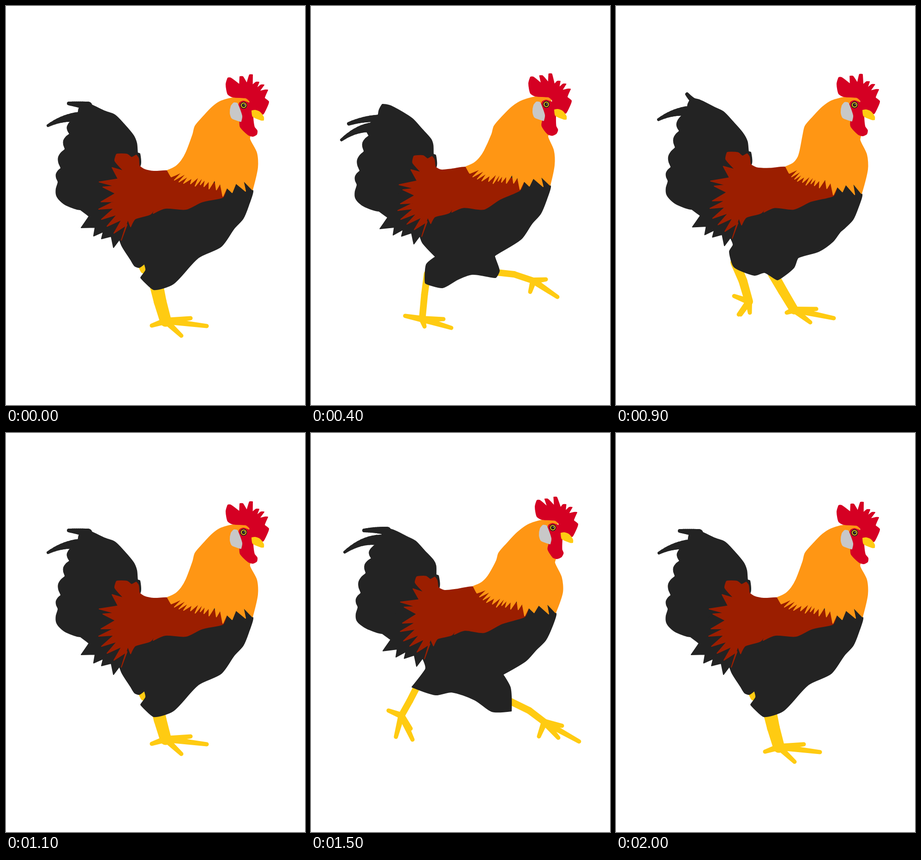
Recreate the animation shown at these times as an HTML page with a canvas. Size 648 px wide and 864 px high, loop 2100 ms.

```html
<!DOCTYPE html>
<html lang="en">
<head>
<meta charset="utf-8">
<title>Running rooster</title>
<style>
html, body { margin: 0; width: 100%; height: 100%; overflow: hidden; background: #fff; }
canvas { display: block; width: 648px; height: 864px; }
</style>
</head>
<body>
<canvas id="stage" width="648" height="864"></canvas>
<script>
const BLACK = '#232323', RUST = '#9b1e00', ORANGE = '#ff9614';
const RED = '#d50023', GREY = '#c8c8c8', YELLOW = '#ffcb12';
const LOOP = 2100, STEP = 100;
const ctx = document.getElementById('stage').getContext('2d');

const lerp = (a, b, k) => a + (b - a) * k;
const lerpAll = (a, b, k) => a.map((v, i) => lerp(v, b[i], k));
const pairs = a => Array.from({ length: a.length >> 1 }, (_, i) => [a[2 * i], a[2 * i + 1]]);
const points = s => pairs(s.split(' ').map(Number));
const shift = (a, dx, dy) => a.map((v, i) => i === 14 ? v : v + (i % 2 ? dy : dx));

// Rows of feathers: a notch between each two tips, pulled towards one spot.
function feathers(tips, spot, depth) {
  return tips.flatMap((tip, i) => {
    if (!i) return [tip];
    return [lerpAll(lerpAll(tips[i - 1], tip, .5), spot, depth(i)), tip];
  });
}

// Rounded bulges between notches.
function scallops(notches) {
  return notches.flatMap((a, i) => {
    const b = notches[i + 1];
    if (!b) return [a];
    return [0, .25, .5, .75].map(u => {
      const out = .24 * Math.sin(Math.PI * u);
      return [lerp(a[0], b[0], u) - (b[1] - a[1]) * out, lerp(a[1], b[1], u) + (b[0] - a[0]) * out];
    });
  });
}

const TAIL = [
  ...points('291 345 290 320 285 318 283 297 276 280 256 256 236 236 215 228 182 213 165 210 158 222 155 236'),
  ...scallops(points('140 250 138 277 128 310 119 351 113 381 130 431')),
  ...points('160 441 240 440')];
const VENT = feathers(points('157 438 163 480 190 498 207 504 233 523 252 521'), [260, 440], () => .2);
const BREAST = points('495 481 514 460 527 428 535 400 500 370 300 380 200 400');
const SADDLE = [
  ...points('350 357 320 358 300 354 289 346 287 330 282 323 272 328 262 321 240 321'),
  ...feathers(points('236 335 230 350 202 381 210 392 206 424 201 440 207 462 219 477 234 492 250 507'), [320, 400], () => .26),
  ...points('264 462 270 478 280 461 314 450 331 418 319 449 345 438 390 440 425 424 470 414 478 395 400 365')];
const NECK = [
  ...points('500 198 466 206 447 219 427 240 410 260 405 278 390 318 380 335 367 348 350 356'),
  ...feathers(points('358 370 365 377 375 381 385 384 400 385 410 390 421 387 429 391 440 396 456 398 470 412 490 404 519 401 534 398'),
    [470, 300], i => .12 + .1 * Math.abs(Math.sin(i * 2.3))),
  ...points('545 350 543 318 528 288 530 276 525 203')];

// Head parts are measured from the eye.
const COMB = feathers(points('-31 -60 -5 -63 16 -67 30 -51 41 -45 49 -34'), [10, -10], () => .33)
  .flatMap(([x, y], i) => i % 2 ? [[x, y]] : [[x - 3, y + 1], [x + 3, y + 1]]);
const FACE = [
  ...points('-23 -18 -34 -24 -38 -45'), ...COMB,
  ...points('45 -16 54 -8 51 2 42 19 21 14 20 25 23 47 29 55 28 63 20 67 10 64 -7 47 -8 35 -4 28 -6 17 -12 5 -8 -6 0 -9 13 -4 13 -9 5 -16')];
const BEAK = points('18 12 25 11 35 15 43 26 43 32 38 32 20 24');
const EAR = points('-27 2 -21 -5 -14 -4 -4 23 -6 35 -25 28 -29 17');

// Places on the body that each pose moves: tail, rump, saddle, neck, breast.
const ANCHORS = points('182 213 256 256 290 325 110 380 157 440 202 385 250 507 390 440 350 356 418 250 545 350 535 400 470 412');
const EYE = [515, 215], NAPE = [500, 198];

// move: shift of each anchor; plumes: base and tip of the two long tail feathers;
// under: thighs and belly; legs: hip, knee, palm, four toe tips, width.
const stand = {
  eye: EYE, tilt: [0],
  move: ANCHORS.flatMap(() => [0, 0]),
  plumes: [178, 216, 136, 211, 165, 241, 91, 259],
  under: [270, 549, 279, 563, 289, 566, 300, 558, 303, 572, 292, 588, 320, 614, 362, 602, 417, 545, 466, 521],
  legA: [292, 560, 298, 572, 310, 578, 340, 582, 335, 578, 325, 585, 340, 588, 14],
  legB: [325, 600, 334, 640, 346, 682, 435, 693, 400, 676, 316, 692, 380, 714, 30]
};
const lift = {
  eye: [510, 213], tilt: [.7],
  move: [-10, 3, -16, 10, -20, 3, -13, 6, -14, 3, -11, 6, -10, -8, -15, 0, -14, -8, -13, 0, -18, -5, -16, -10, -17, -15],
  plumes: [160, 244, 82, 255, 142, 263, 66, 290],
  under: [270, 543, 250, 560, 248, 600, 285, 610, 320, 591, 350, 581, 400, 588, 408, 573, 398, 541, 455, 505],
  legA: [385, 575, 440, 581, 482, 595, 534, 630, 509, 592, 475, 619, 518, 620, 14],
  legB: [252, 580, 246, 625, 241, 678, 304, 697, 287, 678, 204, 671, 246, 694, 15]
};
const stride = {
  eye: [525, 206], tilt: [1],
  move: [-17, -18, -9, -13, -5, -15, -7, -4, 1, -16, 1, -16, -13, -7, 0, -8, 7, -20, 1, 0, 6, -5, 6, -11, 0, -8],
  plumes: [172, 206, 131, 190, 160, 221, 80, 243],
  under: [222, 506, 209, 537, 250, 569, 300, 560, 350, 555, 385, 584, 424, 584, 429, 566, 419, 526, 465, 497],
  legA: [410, 575, 455, 597, 488, 622, 563, 664, 526, 630, 476, 653, 518, 656, 15],
  legB: [212, 530, 203, 570, 186, 610, 176, 674, 196, 646, 158, 600, 157, 650, 15]
};
const land = {
  eye: [517, 214], tilt: [.2],
  move: [-2, -10, -4, -7, 2, -3, 0, -2, 3, -1, 3, -2, 2, -4, -5, 0, 18, -8, 0, 0, 0, 4, -2, 8, 1, -3],
  plumes: [185, 214, 154, 191, 165, 228, 92, 246],
  under: [246, 532, 256, 565, 300, 583, 322, 577, 350, 593, 385, 567, 395, 545, 440, 531, 470, 510, 486, 489],
  legA: [340, 580, 362, 618, 386, 658, 472, 676, 434, 656, 370, 664, 421, 685, 22],
  legB: [258, 555, 275, 595, 288, 640, 290, 664, 266, 668, 256, 628, 270, 668, 20]
};

// The second step of the run exchanges the legs.
const swap = p => ({ ...p, legA: p.legB, legB: p.legA });
const pass = { ...swap(stand), legA: shift(stand.legB, 0, -19) };
const lift2 = {
  eye: [510, 212], tilt: [.6],
  move: shift(lift.move, 3, -1).map((v, i) => i === 14 ? v + 3 : v),
  plumes: shift(lift.plumes, 4, -3),
  under: [268, 536, 253, 552, 254, 582, 296, 587, 325, 578, 372, 607, 412, 600, 400, 578, 402, 541, 455, 508],
  legA: shift(lift.legB, 9, -22),
  legB: shift(lift.legA, 8, 22)
};
const stride2 = {
  eye: [524, 205], tilt: [1],
  move: [-4, -3, -10, -1, -14, -11, -11, -4, -7, -7, -8, -15, -4, -18, -15, -8, 2, -24, -3, 0, 0, -5, -4, -9, -7, -16],
  plumes: [165, 212, 115, 211, 150, 232, 73, 258],
  under: [248, 512, 219, 550, 270, 567, 305, 561, 355, 578, 392, 603, 434, 602, 432, 552, 416, 523, 465, 494],
  legA: [232, 545, 214, 580, 196, 612, 220, 664, 216, 640, 168, 601, 184, 658, 15],
  legB: shift(stride.legA, 18, 4)
};
const settle = { ...stand, eye: [517, 216], plumes: shift(stand.plumes, 2, 1), legB: shift(stand.legB, 7, -2) };

const KEYS = [[0, stand], [400, lift], [700, stride], [900, land], [1100, pass],
  [1300, lift2], [1500, stride2], [1700, swap(land)], [2000, settle], [LOOP, stand]];

// Every point follows the nearest anchors.
function warper(p) {
  const moves = [...pairs(p.move), [p.eye[0] - EYE[0], p.eye[1] - EYE[1]]];
  const spots = [...ANCHORS, NAPE];
  return ([x, y]) => {
    let sum = 0, dx = 0, dy = 0;
    spots.forEach(([ax, ay], i) => {
      const w = 1 / (Math.hypot(x - ax, y - ay) + 2) ** 3;
      sum += w;
      dx += w * moves[i][0];
      dy += w * moves[i][1];
    });
    return [x + dx / sum, y + dy / sum];
  };
}

// Smooth where the outline bends gently, sharp at feather tips.
function blob(pts, color) {
  const n = pts.length, at = i => pts[(i + n) % n];
  const tangent = i => {
    const [a, p, b] = [at(i - 1), at(i), at(i + 1)];
    const u = [p[0] - a[0], p[1] - a[1]], v = [b[0] - p[0], b[1] - p[1]];
    const soft = Math.max(0, (u[0] * v[0] + u[1] * v[1]) / (Math.hypot(...u) * Math.hypot(...v) || 1));
    const len = Math.hypot(u[0] + v[0], u[1] + v[1]) || 1;
    return [(u[0] + v[0]) / len * soft, (u[1] + v[1]) / len * soft];
  };
  ctx.beginPath();
  ctx.moveTo(...pts[0]);
  for (let i = 0; i < n; i++) {
    const p = at(i), q = at(i + 1), s = tangent(i), t = tangent(i + 1);
    const d = Math.hypot(q[0] - p[0], q[1] - p[1]) * .3;
    ctx.bezierCurveTo(p[0] + s[0] * d, p[1] + s[1] * d, q[0] - t[0] * d, q[1] - t[1] * d, ...q);
  }
  ctx.closePath();
  ctx.fillStyle = ctx.strokeStyle = color;
  ctx.lineWidth = 2;
  ctx.fill();
  ctx.stroke();
}

function disc(x, y, r, color) {
  ctx.fillStyle = color;
  ctx.beginPath();
  ctx.arc(x, y, r, 0, Math.PI * 2);
  ctx.fill();
}

function bone(a, b, wa, wb, color) {
  const ang = Math.atan2(b[1] - a[1], b[0] - a[0]), h = Math.PI / 2;
  ctx.fillStyle = color;
  ctx.beginPath();
  ctx.arc(...a, wa / 2, ang + h, ang - h);
  ctx.arc(...b, wb / 2, ang - h, ang + h);
  ctx.fill();
}

function plume(base, tip, wide, thin) {
  const bend = [(base[0] + tip[0]) / 2, base[1] - 3];
  const spot = u => lerpAll(lerpAll(base, bend, u), lerpAll(bend, tip, u), u);
  for (let i = 0; i < 10; i++) {
    bone(spot(i / 10), spot((i + 1) / 10), lerp(wide, thin, i / 10), lerp(wide, thin, (i + 1) / 10), BLACK);
  }
}

function drawLeg(leg) {
  const [hip, knee, palm, ...toes] = pairs(leg), wide = leg[14], thin = wide * .7 + 4;
  bone(hip, knee, wide, (wide + thin) / 2, YELLOW);
  bone(knee, palm, (wide + thin) / 2, thin, YELLOW);
  toes.forEach(tip => bone(palm, tip, 14, 9, YELLOW));
}

function drawHead([x, y], tilt) {
  const lean = ([px, py]) => [px - (px > -20 ? tilt * .38 * Math.max(0, Math.abs(py) - 38) : 0), py];
  ctx.save();
  ctx.translate(x, y);
  blob(FACE.map(lean), RED);
  blob(EAR, GREY);
  blob(BEAK, YELLOW);
  disc(0, 0, 7.5, BLACK);
  disc(0, 0, 5.8, YELLOW);
  disc(0, 0, 4, BLACK);
  disc(1.5, -1, 1, GREY);
  ctx.restore();
}

function draw(time) {
  const i = KEYS.findIndex(key => key[0] > time) - 1;
  const [t0, a] = KEYS[i], [t1, b] = KEYS[i + 1], k = (time - t0) / (t1 - t0);
  const p = {};
  for (const part in a) p[part] = lerpAll(a[part], b[part], k);
  const warp = warper(p), [tuft, tuftTip, sickle, sickleTip] = pairs(p.plumes);

  ctx.fillStyle = '#fff';
  ctx.fillRect(0, 0, 648, 864);
  drawLeg(p.legA);
  drawLeg(p.legB);
  plume(tuft, tuftTip, 18, 8);
  plume(sickle, sickleTip, 24, 6);
  blob(TAIL.map(warp), BLACK);
  blob([...VENT.map(warp), ...pairs(p.under), ...BREAST.map(warp)], BLACK);
  blob(SADDLE.map(warp), RUST);
  blob(NECK.map(warp), ORANGE);
  drawHead(p.eye, p.tilt[0]);
}

ctx.lineJoin = 'round';
const start = performance.now();
let shown = -1;
function tick() {
  const step = Math.floor((performance.now() - start) % LOOP / STEP);
  if (step !== shown) draw((shown = step) * STEP);
  requestAnimationFrame(tick);
}
tick();
</script>
</body>
</html>
```
